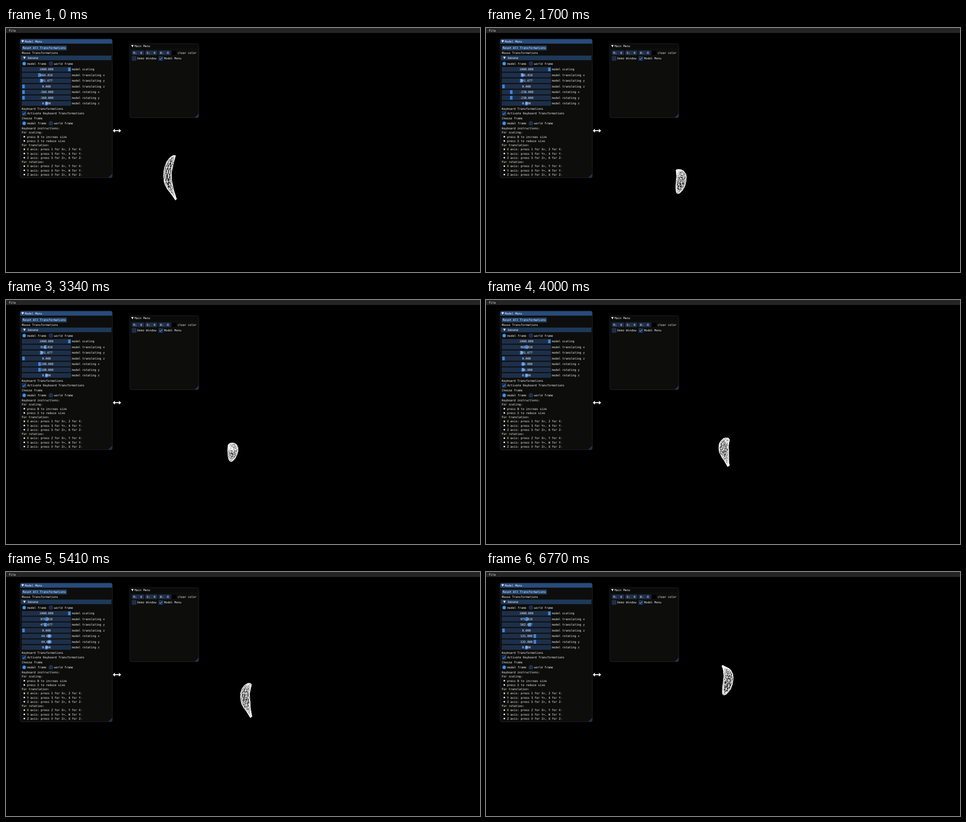
An HTML page that plays this animation: 1043x537 px, repeating every 6800 ms.

```html
<!DOCTYPE html>
<html lang="en">
<head>
<meta charset="utf-8">
<title>Model viewer</title>
<style>
  html, body { margin: 0; width: 100%; height: 100%; overflow: hidden; background: #000; }
  svg { display: block; width: 100vw; height: 100vh; }
  text { font: 6.32px "DejaVu Sans Mono", monospace; fill: #fff; white-space: pre; text-rendering: geometricPrecision; }
</style>
</head>
<body>
<svg id="stage" viewBox="0 0 1043 537"></svg>
<script>
const stage = document.getElementById('stage');
const FRAME = '#1d2f49', ACCENT = '#4296fa', GRAB = '#3d85e0', BORDER = '#2b2b38';

function add(tag, attrs, content) {
  const el = document.createElementNS('http://www.w3.org/2000/svg', tag);
  for (const key in attrs) el.setAttribute(key, attrs[key]);
  if (content !== undefined) el.textContent = content;
  stage.appendChild(el);
  return el;
}
const box = (x, y, w, h, fill, more) => add('rect', { x, y, width: w, height: h, fill, ...more });
const shape = (d, fill, more) => add('path', { d, fill, ...more });
const dot = (cx, cy, r, fill) => add('circle', { cx, cy, r, fill });
// Text is placed by the vertical middle of its capitals.
const label = (x, y, str, more) => add('text', { x, y: y + 2.3, ...more }, str);

function windowPanel(x, y, w, h, titleFill, title) {
  const right = x + w, bottom = y + h;
  box(x, y, w, h, '#0d0d0c', { rx: 3.8 });
  shape(`M${x} ${y + 10.4}v-6.6q0-3.8 3.8-3.8h${w - 7.6}q3.8 0 3.8 3.8v6.6z`, titleFill);
  shape(`M${right} ${bottom - 9}v5.2q0 3.8-3.8 3.8h-5.2z`, '#1d3655');
  box(x, y, w, h, 'none', { rx: 3.8, stroke: BORDER, 'stroke-width': 0.8 });
  shape(`M${x + 3} ${y + 2.9}h5.4l-2.7 4.9z`, '#fff');
  label(x + 10.4, y + 5.4, title);
}

function radio(x, y, str, on) {
  dot(x, y, 5.1, FRAME);
  if (on) dot(x, y, 3.4, ACCENT);
  label(x + 7, y, str);
}

function checkbox(x, y, str, on) {
  box(x, y - 5.1, 10.3, 10.3, FRAME);
  if (on) shape(`M${x + 2.2} ${y + .3}l2.1 2.3l4-4.6`, 'none', { stroke: ACCENT, 'stroke-width': 1.3 });
  label(x + 12.3, y, str);
}

function slider(y, min, max, name) {
  box(34.7, y - 5.1, 108.3, 10.3, FRAME);
  const grab = box(0, y - 4, 5.6, 8.2, GRAB);
  const value = label(89, y, '', { 'text-anchor': 'middle' });
  label(145, y, name);
  return v => {
    grab.setAttribute('x', 35.7 + 101 * (v - min) / (max - min));
    value.textContent = v.toFixed(3);
  };
}

function bullets(y, lines) {
  lines.forEach((str, i) => {
    dot(40.3, y + i * 9.25, 1.7, '#fff');
    label(46.2, y + i * 9.25, str);
  });
}

// Banana: pairs of outer and inner points along the curve, y up.
const sections = [
  [8, 49, 12, 49], [1, 46, 11, 44], [-7, 36, 8, 33], [-12.5, 22, 5, 19],
  [-14.3, 8, 3.5, 8], [-13.5, -7, 4, -6], [-9, -20, 6, -17], [-2, -30, 8, -27],
  [5, -39, 11, -36], [9, -45, 13, -43], [12, -49, 14.5, -46]
];

function sectionAt(u) {
  const last = sections.length - 1;
  const i = Math.min(Math.floor(u), last - 1), f = u - i;
  const at = j => sections[Math.max(0, Math.min(last, j))];
  const [a, b, c, d] = [at(i - 1), at(i), at(i + 1), at(i + 2)];
  return b.map((p, n) => p + f / 2 * (c[n] - a[n]
    + f * (2 * a[n] - 5 * p + 4 * c[n] - d[n] + f * (3 * (p - c[n]) + d[n] - a[n]))));
}

let seed = 7;
const random = () => (seed = seed * 16807 % 2147483647) / 2147483647;

const SIDES = 9, RINGS = 15, DEPTH = 1.3;
const vertices = [];
for (let r = 0; r < RINGS; r++) {
  const end = r === 0 || r === RINGS - 1;
  for (let s = 0; s < SIDES; s++) {
    const u = r / (RINGS - 1) * (sections.length - 1) + (end ? 0 : (random() - .5) * .35);
    const angle = (s + r * .5 + (random() - .5) * .4) / SIDES * 2 * Math.PI;
    const [xo, yo, xi, yi] = sectionAt(u);
    const c = Math.cos(angle) / 2;
    vertices.push([
      (xo + xi) / 2 + (xi - xo) * c,
      (yo + yi) / 2 + (yi - yo) * c,
      Math.hypot(xi - xo, yi - yo) / 2 * DEPTH * Math.sin(angle)
    ]);
  }
}

const SCALE = 1043 / 1920;
function bananaPath(tx, ty, rx, ry) {
  const rad = Math.PI / 180;
  const cx = Math.cos(rx * rad), sx = Math.sin(rx * rad);
  const cy = Math.cos(ry * rad), sy = Math.sin(ry * rad);
  const points = vertices.map(([x, y, z]) => {
    const depth = z * cy - x * sy;
    return [tx * SCALE + x * cy + z * sy, 537 - ty * SCALE - y * cx - depth * sx]
      .map(n => n.toFixed(2)).join(' ');
  });
  let d = '';
  for (let r = 0; r < RINGS; r++) {
    for (let s = 0; s < SIDES; s++) {
      const p = points[r * SIDES + s], side = points[r * SIDES + (s + 1) % SIDES];
      d += `M${p}L${side}`;
      if (r < RINGS - 1) {
        const below = points[(r + 1) * SIDES + s];
        d += `M${p}L${below}L${side}`;
      }
    }
  }
  return d;
}

const banana = shape('', 'none', { stroke: '#fff', 'stroke-width': 0.8, 'stroke-linejoin': 'round' });

box(0, 0, 1043, 10.4, '#242424');
box(0, 0, 1043, 10.2, 'none', { stroke: '#33333a', 'stroke-width': 0.6 });
label(6.3, 5.4, 'File');

windowPanel(31, 24.2, 203, 305.3, '#294a7a', 'Model Menu');
box(34.7, 38.9, 99, 10.3, '#23456d');
label(36.8, 44, 'Reset All Transformations');
label(34.7, 55, 'Mouse Transformations');
box(32.8, 60.6, 199.2, 10.2, '#1f3958');
shape('M37.8 63.2h5.6l-2.8 5z', '#fff');
label(48, 65.8, 'banana');
radio(40, 78.4, 'model frame', true);
radio(98.8, 78.4, 'world frame', false);

const rows = [
  ['scaling', 0, 1000], ['translating x', 0, 1920], ['translating y', 0, 988], ['translating z', 0, 1000],
  ['rotating x', -360, 360], ['rotating y', -360, 360], ['rotating z', -360, 360]
];
const sliders = rows.map(([name, min, max], i) => slider(91 + i * 12.5, min, max, 'model ' + name));

label(34.7, 177.2, 'Keyboard Transformations');
checkbox(34.7, 188, 'Activate Keyboard Transformations', true);
label(34.7, 199, 'Choose frame');
radio(40, 209.8, 'model frame', true);
radio(98.8, 209.8, 'world frame', false);
label(34.7, 220.8, 'Keyboard instructions:');
label(34.7, 230, 'For scaling:');
bullets(239.3, ['press B to increas size', 'press S to reduce size']);
label(34.7, 257.8, 'For translation:');
bullets(267, ['X axis: press 1 for X+, 2 for X-', 'Y axis: press 3 for Y+, 4 for Y-', 'Z axis: press 5 for Z+, 6 for Z-']);
label(34.7, 294.8, 'For rotation:');
bullets(304, ['X axis: press Z for X+, Y for X-', 'Y axis: press X for Y+, W for Y-', 'Z axis: press V for Z+, U for Z-']);

windowPanel(272.5, 34.6, 151.5, 162.8, '#0a0a0a', 'Main Menu');
['R', 'G', 'B'].forEach((channel, i) => {
  const x = 276.7 + i * 29.4;
  box(x, 49.4, 27, 10.2, FRAME);
  label(x + 3.6, 54.6, channel + ':  0');
});
box(365.5, 49.4, 10, 10.2, '#000', { stroke: '#1a1a20', 'stroke-width': 0.5 });
label(377.5, 54.6, 'clear color');
checkbox(276.7, 67, 'Demo Window', false);
checkbox(335.5, 67, 'Model Menu', true);

shape('M235 226l4.8-4.3v3.4h8.6v-3.4l4.8 4.3l-4.8 4.3v-3.4h-8.6v3.4z', '#fff');

// Progress of the held keys, as [step, count].
const LOOP = 6800, STEP = 33.35;
const progress = [[0, 0], [5, 0], [51, 122], [76, 189], [100, 252], [138, 351], [162, 404], [203, 491]];

function countAt(step) {
  const i = Math.max(1, progress.findIndex(([s]) => s >= step));
  const [s0, c0] = progress[i - 1], [s1, c1] = progress[i];
  return Math.round(c0 + (c1 - c0) * (step - s0) / (s1 - s0));
}

function draw(time) {
  const step = Math.min(203, Math.floor((time % LOOP + 5) / STEP));
  const count = countAt(step);
  const tx = 664.419 + Math.min(count, 311);
  const ty = 381.677 + Math.max(0, count - 310);
  const rx = count - 360;
  const ry = rx + (count >= 450 ? 1 : 0);
  [1000, tx, ty, 0, rx, ry, 0].forEach((v, i) => sliders[i](v));
  banana.setAttribute('d', bananaPath(tx, ty, rx, ry));
}

const start = performance.now();
function tick() {
  draw(performance.now() - start);
  requestAnimationFrame(tick);
}
tick();
</script>
</body>
</html>
```
